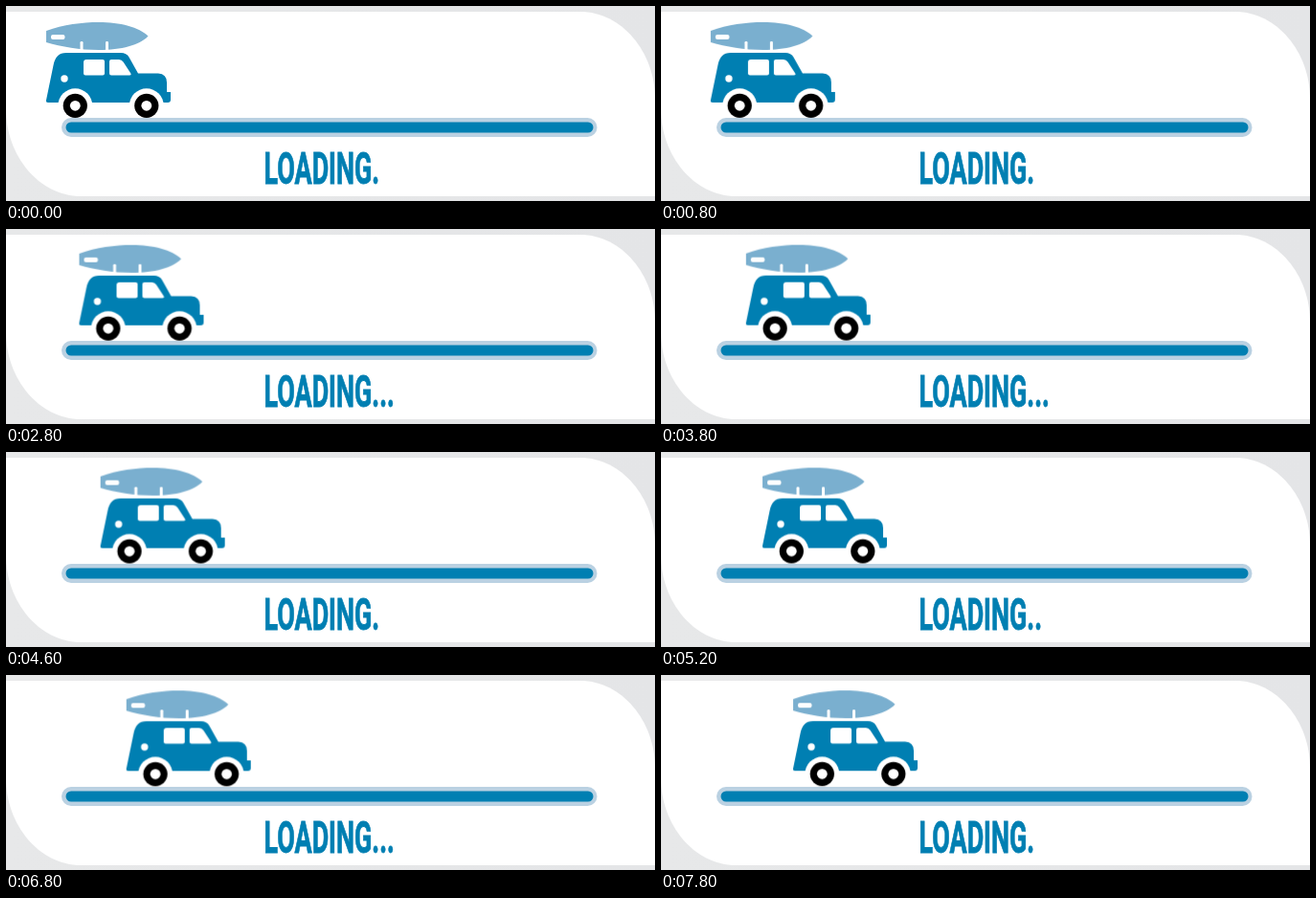
These frames come from a looping animation (678 px wide and 204 px high, 8000 ms). An HTML page:

```html
<!DOCTYPE html>
<html lang="en">
<head>
<meta charset="utf-8">
<title>Loading</title>
<style>
  html, body { margin: 0; width: 100%; height: 100%; overflow: hidden; background: #e6e7e8; }
  svg { display: block; width: 678px; height: 204px; }
  .blue { fill: #007fb2; }
  .white { fill: #fff; }
  .car { animation: drive 8s steps(40, end) infinite; }
  .label {
    font: 700 46.4px Roboto, "Liberation Sans", sans-serif;
    stroke: #007fb2;
    stroke-width: .9px;
  }
  .second { animation: second 8s step-end infinite; }
  .third { animation: third 8s step-end infinite; }

  @keyframes drive {
    from { transform: translate(0, 0); }
    to { transform: translate(98.5px, -.8px); }
  }
  @keyframes second {
    0%, 50%, 95%, 100% { visibility: hidden; }
    20%, 65% { visibility: visible; }
  }
  @keyframes third {
    0%, 50%, 95%, 100% { visibility: hidden; }
    35%, 80% { visibility: visible; }
  }
</style>
</head>
<body>
<svg viewBox="0 0 678 204">
  <defs>
    <linearGradient id="backdrop">
      <stop offset="0" stop-color="#e7e8e9"/>
      <stop offset="1" stop-color="#e4e5e7"/>
    </linearGradient>
    <g id="wheel">
      <circle r="18" class="white"/>
      <circle r="12.6"/>
      <circle r="5.4" class="white"/>
    </g>
  </defs>

  <rect width="678" height="204" fill="url(#backdrop)"/>
  <path class="white" d="M0 6H600C643 6 678 48 678 97V199H78C35 199 0 157 0 108Z"/>

  <g class="car">
    <path fill="#7aafcf" d="M42 26C60 19.500 79 17 97 17C119 17 139 22 148.500 31.500C140 41 120 46 97 46C77 46 58 42.500 42 38Z"/>
    <rect class="white" x="47" y="30" width="14.500" height="5" rx="2"/>
    <rect class="white" x="77.500" y="37" width="3" height="12" rx="1.200"/>
    <rect class="white" x="104" y="37" width="3" height="12" rx="1.200"/>

    <path class="blue" d="M42 98.500L49.500 62C51.500 53 55 49 63 49H120Q126 49 128.500 53.500L138 70.500H159Q168 71 168 80V90H172V98Q172 101 169 101H44Q41.500 101 42 98.500Z"/>
    <path class="white" d="M84 56H101Q103 56 103 58V70.500Q103 72.500 101 72.500H83Q81 72.500 81 70.500V59Q81 56 84 56Z"/>
    <path class="white" d="M110 56H118Q121 56 122.500 58.500L130 70Q131.500 72.500 129 72.500H110Q108 72.500 108 70.500V58Q108 56 110 56Z"/>
    <circle class="white" cx="61" cy="76" r="3.700"/>
    <use href="#wheel" x="72.300" y="104.300"/>
    <use href="#wheel" x="146.800" y="104.300"/>
  </g>

  <rect x="58" y="117" width="559.500" height="20" rx="10" fill="#bad1e2"/>
  <rect class="blue" x="62.500" y="121.500" width="551" height="11" rx="5.500"/>

  <!-- Condensed display lettering -->
  <text class="label blue" transform="translate(269.500 185.500) scale(.58 1)">LOADING.<tspan class="second">.</tspan><tspan class="third">.</tspan></text>
</svg>
</body>
</html>
```
